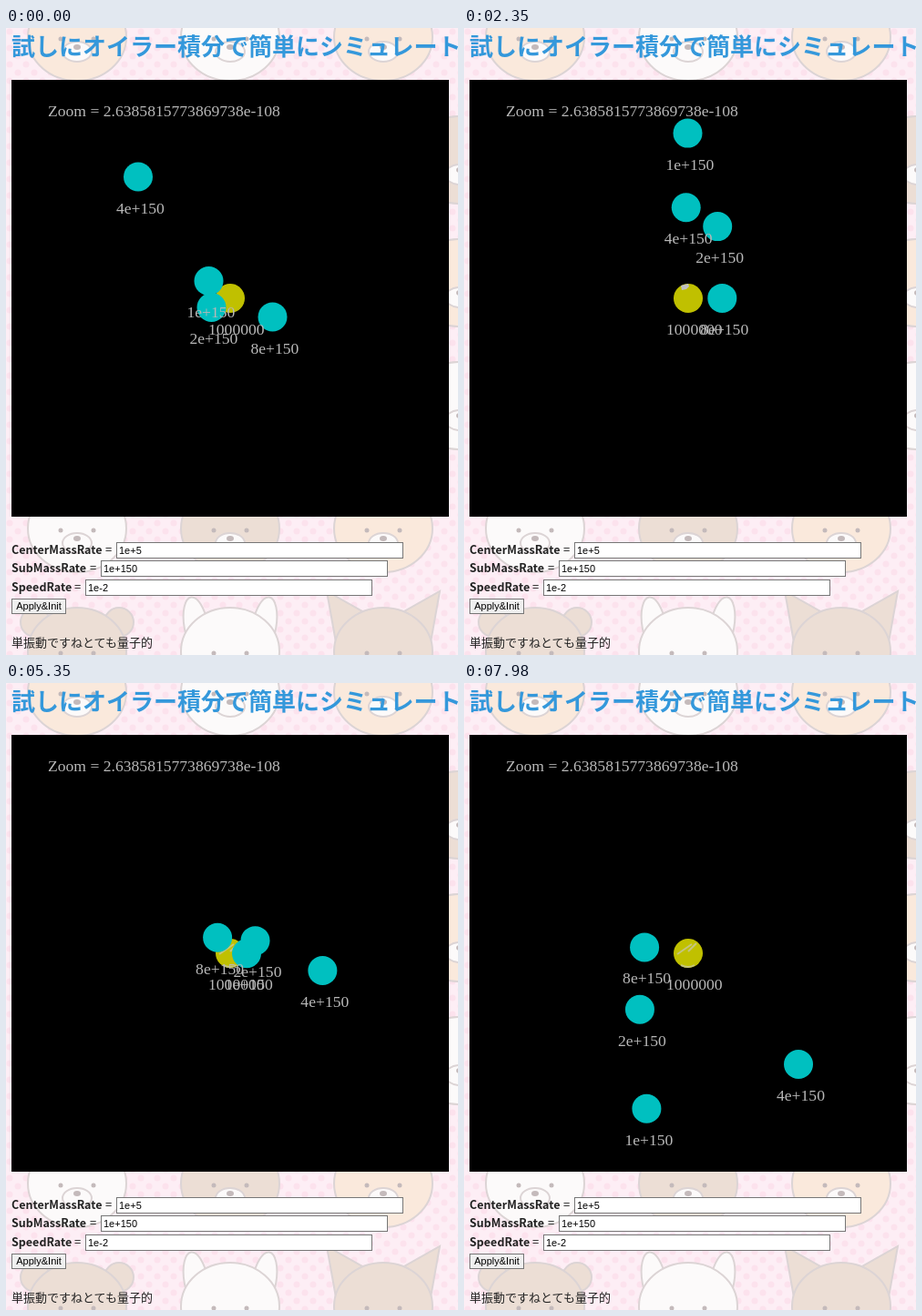
Recreate the animation shown at these times as an HTML page. Size 496 by 689 pixels, loop 8000 ms.

```html
<!DOCTYPE html>
<html lang="ja">
<head>
<meta charset="utf-8">
<title>Euler integration</title>
<style>
  html, body { margin: 0; width: 100%; height: 100%; overflow: hidden; background: #fdeef5; }
  body { position: relative; font: 13px "Noto Sans CJK JP", "Noto Sans", sans-serif; color: #222; }
  svg { position: absolute; left: 0; top: 0; }
  h1, p, b, i, .field, .button { position: absolute; margin: 0; white-space: nowrap; box-sizing: border-box; }
  h1 { left: 6px; top: -1px; font-size: 26px; line-height: 40px; font-weight: 700; color: #3498db; }
  b { left: 6px; font-size: 12.5px; line-height: 18px; }
  i { font-style: normal; line-height: 18px; }
  .field, .button { border: 1px solid #767676; font: 11px/16px "Liberation Sans", Arial, sans-serif; color: #000; }
  .field { width: 315px; height: 18px; padding-left: 2px; background: #fff; }
  .button { left: 6px; top: 627px; width: 60px; height: 17px; line-height: 15px; text-align: center; background: #efefef; }
  p { left: 6px; top: 665px; line-height: 20px; font-weight: 500; }
  .sim text { font: 17.6px "Liberation Serif", "Times New Roman", serif; fill: #b8b8b8; }
</style>
</head>
<body>
<svg width="496" height="689" viewBox="0 0 496 689">
  <defs>
    <pattern id="dots" width="18" height="18" patternUnits="userSpaceOnUse">
      <g fill="#fce2ed"><circle cx="4" cy="4" r="3.5"/><circle cx="13" cy="13" r="3.5"/></g>
    </pattern>
  </defs>
  <rect width="496" height="689" fill="url(#dots)"/>
  <g id="animals" stroke="#dcd4d5" stroke-width="2"></g>
  <rect x="6" y="57" width="480" height="480"/>
  <g class="sim">
    <text x="46" y="97">Zoom = 2.6385815773869738e-108</text>
    <circle cx="246" cy="297" r="16" fill="#c0c000"/>
    <path id="early" d="M238 283l8-2 1 3-3 3-5 1z" fill="#c0c0c0"/>
    <path id="late" d="M234 298l16-11M246 295l9-9M238 310q8 4 15 0" fill="none" stroke="#c4c480" stroke-width="2"/>
    <g id="discs"></g>
    <g id="labels"><text x="222" y="337">1000000</text></g>
  </g>
</svg>
<h1>試しにオイラー積分で簡単にシミュレート</h1>
<div id="form"></div>
<div class="button">Apply&amp;Init</div>
<p>単振動ですねとても量子的</p>
<script>
const $ = id => document.getElementById(id);

function set(el, attrs) {
  for (const k in attrs) el.setAttribute(k, attrs[k]);
  return el;
}

function add(parent, tag, attrs = {}, text = '') {
  const el = set(document.createElementNS('http://www.w3.org/2000/svg', tag), attrs);
  el.textContent = text;
  return parent.appendChild(el);
}

// One head; the letter picks colour and ears
function animal(kind, x, y) {
  const g = $('animals'), ink = { fill: '#c4babb', stroke: 'none' };
  const fill = 'wr'.includes(kind) ? '#fcfafa' : kind === 'c' ? '#fae9dc' : '#ecded5';
  for (const s of [-1, 1]) {
    if (kind === 't') add(g, 'path', { d: `M${x + s * 52} ${y - 10}L${x + s * 62} ${y - 66}L${x + s * 16} ${y - 40}Z`, fill });
    else if (kind === 'r') add(g, 'ellipse', { cx: x + s * 32, cy: y - 34, rx: 13, ry: 32, fill, transform: `rotate(${s * 10} ${x} ${y})` });
    else add(g, 'circle', { cx: x + s * 46, cy: y - 32, r: 16, fill });
  }
  add(g, 'ellipse', { cx: x, cy: y, rx: 54, ry: 48, fill });
  for (const s of [-1, 1]) add(g, 'circle', { cx: x + s * 18, cy: y + 2, r: 2.5, ...ink });
  add(g, 'ellipse', { cx: x, cy: y + 16, rx: 16, ry: 11, fill: '#fcfafa' });
  add(g, 'ellipse', { cx: x, cy: y + 11, rx: 4, ry: 3, ...ink });
}

// Middle rows are shifted by half a cell
['cwc', 'bcb', 'wbc', 'bcw', 'wbc', 'brt'].forEach((row, r) => {
  const shift = r > 0 && r < 4 ? 84 : 0;
  [...row].forEach((kind, c) => animal(kind, 78 + 168 * c + shift, 10 + 135 * r));
});

$('form').innerHTML = ['CenterMassRate 1e+5', 'SubMassRate 1e+150', 'SpeedRate 1e-2'].map((line, i) => {
  const [name, value] = line.split(' '), x = 121 - 17 * i, y = 565 + Math.floor(20.5 * i);
  return `<b style="top:${y - 1}px">${name}</b><i style="top:${y - 1}px;left:${x - 12}px">=</i>` +
    `<div class="field" style="top:${y}px;left:${x}px">${value}</div>`;
}).join('');

// Natural cubic spline through (ts, vs)
function spline(ts, vs) {
  const n = ts.length, c = [0], d = [0], m = Array(n).fill(0);
  const h = i => ts[i + 1] - ts[i], slope = i => (vs[i + 1] - vs[i]) / h(i);
  for (let i = 1; i < n - 1; i++) {
    const p = 2 * (h(i - 1) + h(i)) - h(i - 1) * c[i - 1];
    c[i] = h(i) / p;
    d[i] = (6 * (slope(i) - slope(i - 1)) - h(i - 1) * d[i - 1]) / p;
  }
  for (let i = n - 2; i > 0; i--) m[i] = d[i] - c[i] * m[i + 1];
  return t => {
    let i = 0;
    while (i < n - 2 && t > ts[i + 1]) i++;
    const w = h(i), b = (t - ts[i]) / w, a = 1 - b;
    return a * vs[i] + b * vs[i + 1] + ((a ** 3 - a) * m[i] + (b ** 3 - b) * m[i + 1]) * w * w / 6;
  };
}

// Each orbit is a smooth path through a few points
const knots = [0, 1350, 3320, 4540, 6160, 6960, 7980];
const orbits = {
  '1e+150': [[222.5, 232.5, 260.5, 272, 247, 228, 200], [278, 148, 135, 214, 383, 440, 468]],
  '2e+150': [[225.5, 258.5, 290, 288.5, 250.5, 225.5, 192.5], [307, 238, 222, 250, 318, 341.5, 359]],
  '4e+150': [[145, 201, 284, 327.5, 360.5, 367, 367], [163.5, 176, 229, 280.5, 351.5, 384, 419.5]],
  '8e+150': [[292.5, 291, 270, 247.5, 217.5, 206, 198], [317.5, 306, 288.5, 281, 281, 284, 290.5]]
};
const bodies = Object.entries(orbits).map(([name, [xs, ys]]) => ({
  x: spline(knots, xs), y: spline(knots, ys),
  disc: add($('discs'), 'circle', { r: 16, fill: '#00c0c0' }),
  label: add($('labels'), 'text', {}, name)
}));

// The picture updates about ten times a second, with a short stall near 2.6 s
const hold = (t, step, phase) => Math.max(0, Math.floor((t - phase) / step) * step + phase);
const tick = t => t < 2600 ? hold(t, 100, 50) : hold(t, 101, -13);

const start = performance.now();
function draw() {
  const t = tick((performance.now() - start) % 8000);
  for (const b of bodies) {
    const x = b.x(t), y = b.y(t);
    set(b.disc, { cx: x, cy: y });
    set(b.label, { x: x - 24, y: y + 40 });
  }
  $('early').style.display = t > 900 && t < 4500 ? '' : 'none';
  $('late').style.display = t >= 4500 ? '' : 'none';
  requestAnimationFrame(draw);
}
draw();
</script>
</body>
</html>
```
